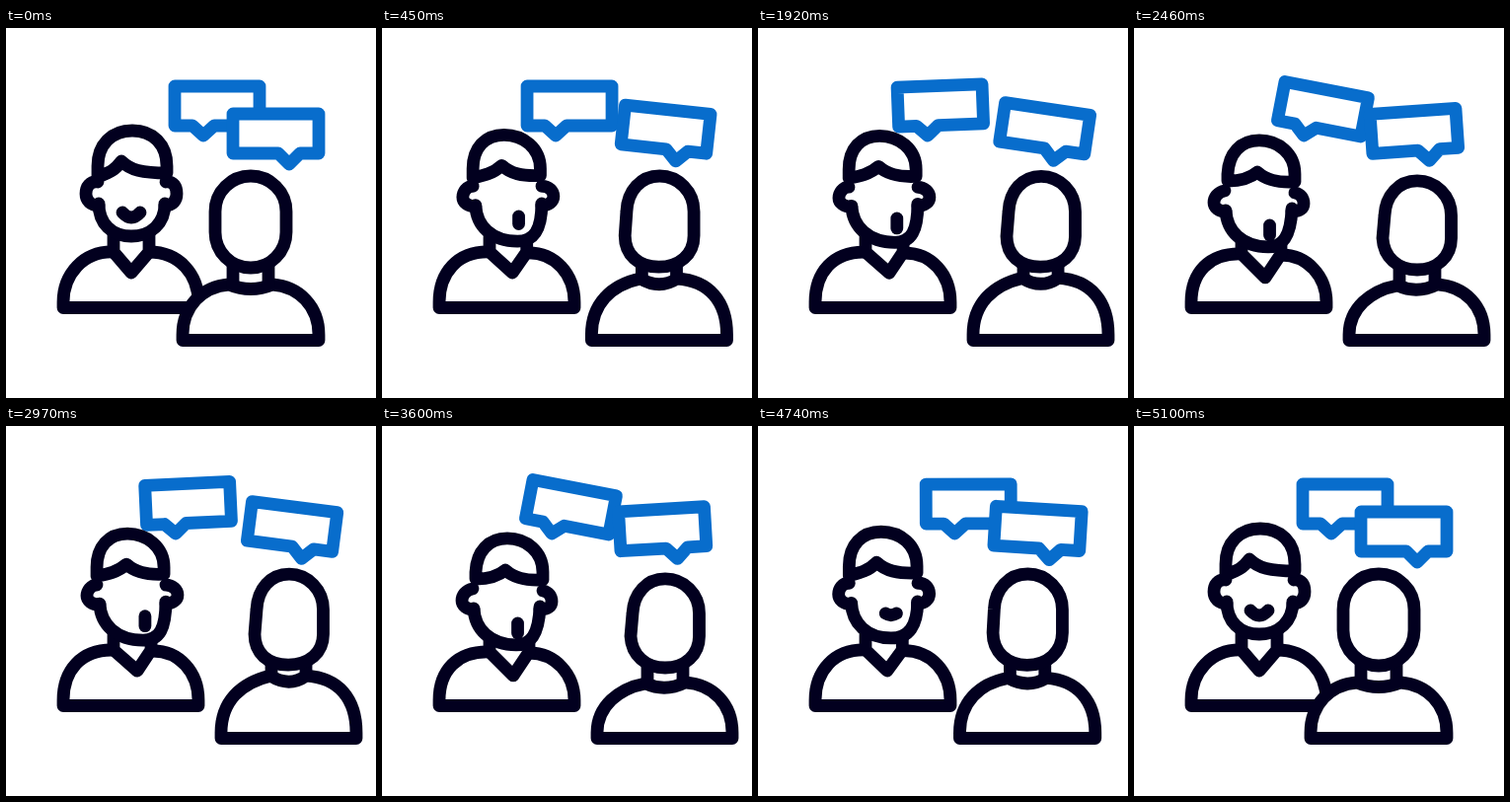
Write an HTML page that moves like this. It is 375 by 375 pixels and loops after 5400 ms.

```html
<!DOCTYPE html>
<html lang="en">
<head>
<meta charset="utf-8">
<title>Conversation</title>
<style>
html, body { margin: 0; width: 100%; height: 100%; overflow: hidden; background: #fff; }
svg { display: block; width: 100vw; height: 100vh; }
path { fill: none; stroke: #02001f; stroke-width: 12.8; stroke-linecap: round; stroke-linejoin: round; }
.solid { fill: #fff; }
.bubble { fill: #fff; stroke: #086dcc; }
</style>
</head>
<body>
<svg viewBox="0 0 375 375">
  <path id="bubbleL" class="bubble" d="M-29-50H57V-10H11L0 0L-11-10H-29Z"/>
  <path id="bubbleR" class="bubble" d="M-57-51H30V-11H11L0 0L-11-11H-57Z"/>
  <path id="bodyL" class="solid"/>
  <path id="neckL" class="solid"/>
  <path id="face" class="solid"/>
  <path id="earL"/>
  <path id="earR"/>
  <path id="hair" class="solid"/>
  <path id="mouth"/>
  <path id="bodyR" class="solid"/>
  <path id="neckR"/>
  <path id="headR" class="solid"/>
</svg>
<script>
const LOOP = 5400, BEAT = 1200, TAU = Math.PI * 2;
const $ = id => document.getElementById(id);
const lerp = (a, b, k) => a + (b - a) * k;
const clamp = (x, lo, hi) => Math.min(hi, Math.max(lo, x));
const ramp = (t, from, to) => (1 - Math.cos(Math.PI * clamp((t - from) / (to - from), 0, 1))) / 2;

// Each shape: resting, head up, head down.
const shapes = {
  hair: [
    'M93 151V140C93 118 107 104 128 104S163 118 163 140V147C138 147 126 144 117 135C110 145 103 147 93 151Z',
    'M92 152V143C92 122 104 109 123 109S160 122 160 143V150C142 151 131 148 122 140C113 148 103 150 92 152Z',
    'M95 155V148C96 127 108 114 127 114S163 127 163 148V156C145 157 134 154 125 146C117 153 106 155 95 155Z'
  ],
  face: [
    'M94 178C94 198 107 211 127 211C147 211 161 198 161 178',
    'M95 180C96 201 112 217 139 217C156 217 162 205 162 178',
    'M93 185C94 206 110 222 136 222C151 222 159 211 160 183'
  ],
  earL: [
    'M93 156C85 155 81 161 81 168S86 180 94 180',
    'M92 161C86 161 82 167 82 172S87 181 95 181',
    'M92 165C85 166 81 172 81 177S86 186 93 186'
  ],
  earR: [
    'M162 156C170 155 173 161 173 168S169 180 161 180',
    'M162 161C169 161 174 166 174 171S169 180 162 180',
    'M163 167C169 168 172 173 172 178S168 186 160 186'
  ],
  bodyL: [
    'M109 227C78 226 58 250 58 278V283.5H195V278C195 250 176 227 145 227',
    'M109 227C76 226 58 248 58 278V283.5H195V278C195 250 176 227 147 228',
    'M109 229C76 228 58 248 58 278V283.5H195V278C195 252 176 230 149 230'
  ],
  neckL: [
    'M109 210V227L127 248L145 227V210',
    'M109 212V227L133 248L147 227V214',
    'M109 216V229L133 253L149 229V220'
  ],
  bodyR: [
    'M179 316.5V311C179 282 199 262 226 260Q248 269 270 260C297 262 317 282 317 311V316.5Z',
    'M218 316.5V311C218 279 238 260 268 253Q287 265 304 253C338 255 355 277 355 311V316.5Z',
    'M218 316.5V311C218 284 240 266 267 261Q287 270 307 260C336 262 355 282 355 311V316.5Z'
  ],
  neckR: [
    'M230 242V260M266 242V260',
    'M269 242V252M304 242V252',
    'M269 244V260M305 244V260'
  ],
  headR: [
    'M212 186C212 166 228 150 248 150S284 166 284 186V207C284 227 268 243 248 243S212 227 212 207Z',
    'M254 186C255 165 268 150 287 150S321.5 166 321.5 186V211C321.5 230 307 242 286 242S252 230 252 211Z',
    'M254 190C255 170 268 155 287 155S321.5 170 321.5 190V213C321.5 232 307 245 287 245S253 232 252 213Z'
  ]
};

const NUM = /-?[\d.]+/g;
const morphs = Object.entries(shapes).map(([id, poses]) => ({
  el: $(id), base: poses[0], sets: poses.map(p => p.match(NUM).map(Number))
}));

function morph({ el, base, sets: [rest, up, down] }, talk, nod) {
  let i = 0;
  el.setAttribute('d', base.replace(NUM, () => {
    const v = lerp(rest[i], lerp(up[i], down[i], nod), talk);
    i++;
    return v.toFixed(2);
  }));
}

function place(el, x, y, angle) {
  el.setAttribute('transform', `translate(${x} ${y}) rotate(${angle})`);
}

function drawMouth(t, talk, nod) {
  const open = ramp(t, 150, 600) - ramp(t, 4140, 4380);
  const w = t < 2400 ? lerp(9, 0, ramp(t, 0, 450))
                     : lerp(0, 3, ramp(t, 4200, 4380)) + 6 * ramp(t, 4440, 5100);
  const shut = (1 - open) * talk;
  const h = 5 * open;
  const x = lerp(127, 141 - 3.5 * nod, talk) - 2 * shut;
  const y = lerp(187, 197.5 + 7.5 * nod, talk) - 6 * shut;
  const sag = 10 * (1 - talk);
  $('mouth').setAttribute('d', `M${x - w} ${y - h}Q${x} ${y + sag} ${x + w} ${y + h}`);
}

function draw(t) {
  const talk = ramp(t, 0, 600) - ramp(t, 4500, 5100);
  const nod = (1 - Math.cos(TAU * (clamp(t, 630, 4230) - 630) / BEAT)) / 2;
  const lean = ramp(t, 630, 1230) - ramp(t, 4230, 4830);
  const shift = ramp(t, 0, 600) - ramp(t, 4200, 4800);
  const sway = 2.25 + 6.25 * Math.cos(TAU * (clamp(t, 690, 4290) - 690) / BEAT);
  const swing = sway * (ramp(t, 0, 690) - ramp(t, 4290, 5100));

  place($('bubbleL'), 200 - 28 * shift, 109, 14 * nod - 3 * lean);
  place($('bubbleR'), 287 + 12.5 * talk, 138 - 3.6 * talk, swing);
  for (const m of morphs) morph(m, talk, nod);
  drawMouth(t, talk, nod);
}

const start = performance.now();
function tick() {
  draw((performance.now() - start) % LOOP);
  requestAnimationFrame(tick);
}
tick();
</script>
</body>
</html>
```
